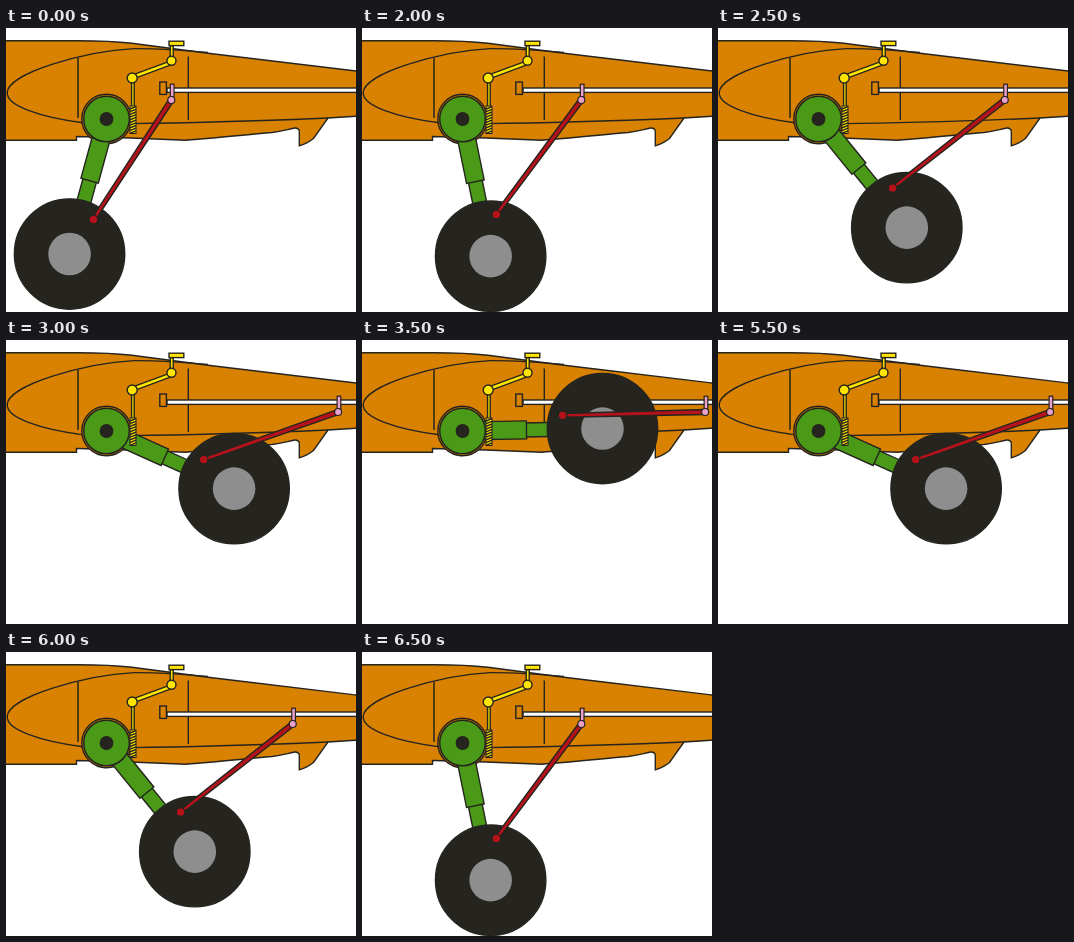
An HTML page for the animation above (7000 ms loop, 350 by 284 pixels).

```html
<!DOCTYPE html>
<html lang="en">
<head>
<meta charset="utf-8">
<title>Retracting landing gear</title>
<style>
  html, body { margin: 0; width: 100%; height: 100%; overflow: hidden; background: #fff; }
  svg { display: block; width: 100vw; height: 100vh; }
  .body { fill: #d98100; }
  .line { fill: none; }
  .green { fill: #4a9a18; }
  .yellow { fill: #ffe500; }
  .red { fill: #b5121b; }
  .pink { fill: #eba0cb; }
  .white { fill: #fff; }
  .dark { fill: #25241f; }
</style>
</head>
<body>
<svg viewBox="0 0 350 284" stroke="#25241f" stroke-width="1.4">
  <!-- fuselage -->
  <path class="body" d="M-3 12.7H72C98 12.7 112 13.6 126 15.2L202 25.2L353 43.4V88L322 90L307.5 110.5Q302 115 293.3 117.8V103.5Q293 99.8 288.5 100C281 101.5 276 103.5 266 104.5C240 106.5 208 110.5 180 112.2L124 110L70.5 108.5V112.3H-3Z"/>
  <path class="line" d="M202 24.4C170 21.5 150 20.4 128 20.6C80 23 1.2 45 1.2 65C1.2 78 34 89 77 94.8M124 95.6C190 95 250 93 322 90M182.3 28.5V92"/>
  <path class="line" stroke-width="1.5" d="M72 30V90"/>
  <circle class="body" cx="100.5" cy="91" r="24.7"/>

  <!-- slide rail -->
  <rect class="white" x="161" y="60" width="195" height="4.4"/>
  <rect class="body" x="153.8" y="54" width="6.6" height="12.4"/>

  <!-- leg, drawn along +x from the pivot -->
  <g id="leg">
    <rect class="green" x="60" y="-7" width="40" height="14"/>
    <rect class="green" x="10" y="-9" width="54" height="18"/>
  </g>
  <circle class="green" cx="100.5" cy="91" r="22.8" stroke-width="1.5"/>
  <circle class="dark" cx="100.5" cy="91" r="6.2"/>

  <!-- hand lever and worm -->
  <rect class="yellow" x="164.2" y="17.5" width="3" height="13"/>
  <rect class="yellow" x="163" y="13.2" width="14.8" height="4.4"/>
  <path d="M126 49.2L165.5 34.6" stroke-width="5.2"/>
  <path d="M126 49.2L165.5 34.6" stroke="#ffe500" stroke-width="2.6"/>
  <rect class="yellow" x="125.6" y="50" width="2.6" height="30"/>
  <circle class="yellow" cx="165.5" cy="32.8" r="4.5"/>
  <circle class="yellow" cx="126.2" cy="50" r="5"/>
  <rect class="yellow" x="124" y="78" width="6" height="27.5" stroke-width="1"/>
  <path id="worm" class="line"/>

  <g id="wheel">
    <circle class="dark" r="55.2"/>
    <circle r="21.3" fill="#8e8e8e" stroke="none"/>
  </g>

  <!-- strut and slider -->
  <path id="strut" class="red"/>
  <circle id="pin" class="red" r="4.3" stroke-width="1.2"/>
  <g id="slider" class="pink" stroke-width="1.2">
    <rect x="-1" y="56.2" width="3.7" height="13"/>
    <circle cy="72" r="3.5"/>
  </g>
</svg>
<script>
const PIVOT = { x: 100.5, y: 91 };
const WHEEL_R = 140, PIN_R = 101.3, PIN_LAG = 7.9;
const STRUT = 142.6, RAIL_Y = 72;
const ANGLES = [105.3, 78.4, 50.9, 24.3, -1];
const STEPS = [[2000, 0], [2500, 1], [3000, 2], [3500, 3], [5500, 4], [6000, 3], [6500, 2], [7000, 1]];
const LOOP = 7000;

const el = id => document.getElementById(id);
const set = (id, name, value) => el(id).setAttribute(name, value);
const move = (id, x, y) => set(id, "transform", `translate(${x} ${y})`);

function polar(r, degrees) {
  const a = degrees * Math.PI / 180;
  return { x: PIVOT.x + r * Math.cos(a), y: PIVOT.y + r * Math.sin(a) };
}

// A bar from a to b with its own half width at each end.
function taper(a, b, wa, wb) {
  const length = Math.hypot(b.x - a.x, b.y - a.y);
  const nx = (a.y - b.y) / length, ny = (b.x - a.x) / length;
  const corner = (p, w) => `${p.x + nx * w} ${p.y + ny * w}`;
  return `M${corner(a, wa)}L${corner(b, wb)}L${corner(b, -wb)}L${corner(a, -wa)}Z`;
}

function pose(angle) {
  const wheel = polar(WHEEL_R, angle);
  const pin = polar(PIN_R, angle - PIN_LAG);
  // The strut has a fixed length, so the pin sets the slider position.
  const slide = pin.x + Math.sqrt(STRUT ** 2 - (pin.y - RAIL_Y) ** 2);
  set("leg", "transform", `translate(${PIVOT.x} ${PIVOT.y}) rotate(${angle})`);
  move("wheel", wheel.x, wheel.y);
  move("pin", pin.x, pin.y);
  move("slider", slide, 0);
  set("strut", "d", taper(pin, { x: slide, y: RAIL_Y }, 1.9, 2.5));
}

let thread = "";
for (let y = 81; y < 106; y += 2.7) thread += `M124 ${y}l6 -2.4`;
set("worm", "d", thread);

function frame(now) {
  const t = now % LOOP;
  pose(ANGLES[STEPS.find(([end]) => t < end)[1]]);
  requestAnimationFrame(frame);
}
pose(ANGLES[0]);
requestAnimationFrame(frame);
</script>
</body>
</html>
```
